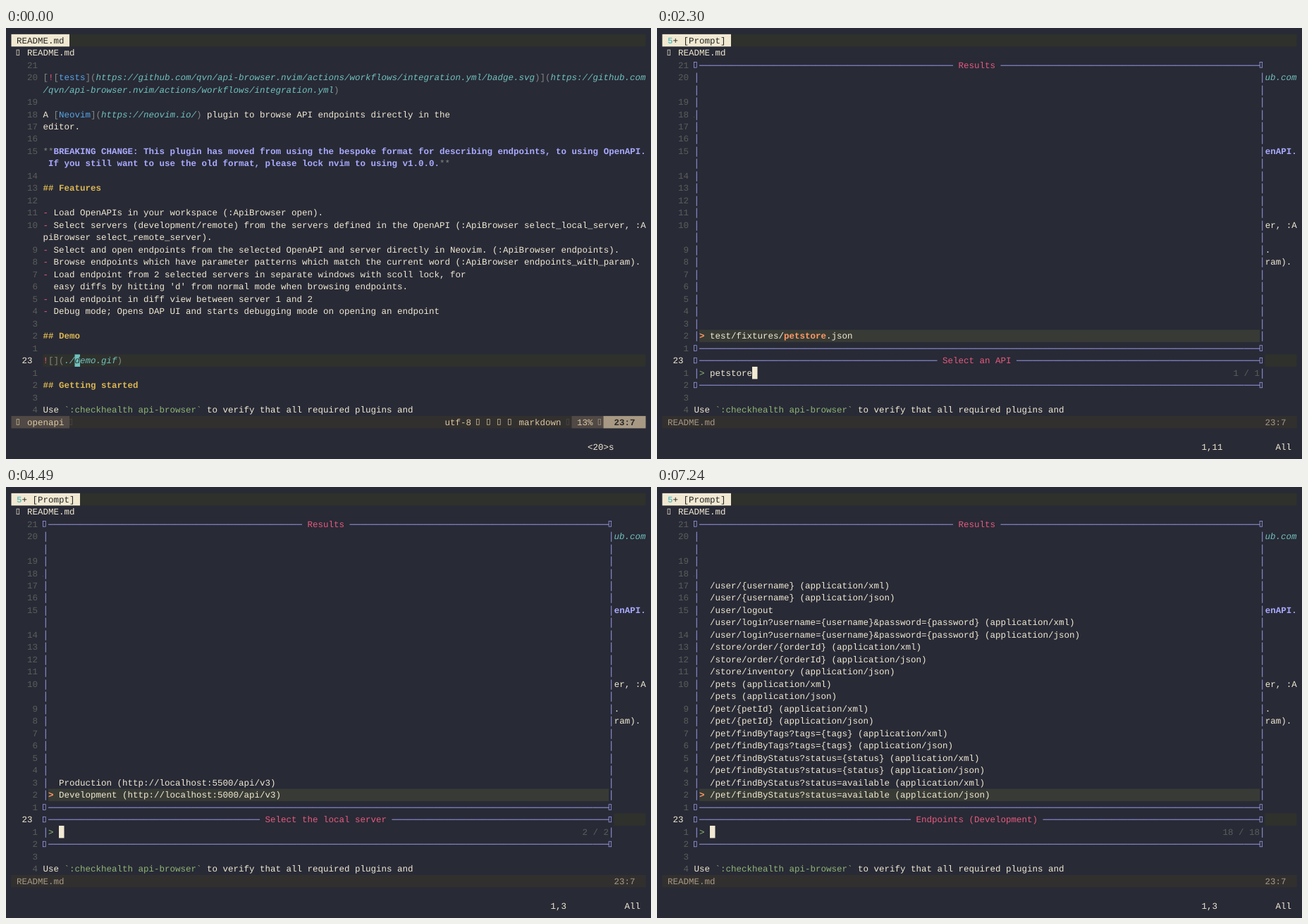
These frames come from a looping animation (915x612 px, 8 s). An HTML page:

```html
<!DOCTYPE html>
<html lang="en">
<head>
<meta charset="utf-8">
<title>API browser demo</title>
<style>
html, body { margin: 0; width: 100%; height: 100%; overflow: hidden; background: #282a36; }
svg {
  display: block;
  font-family: "Liberation Mono", monospace;
  font-size: 12.5px;
}
text { white-space: pre; text-rendering: geometricPrecision; }
.b { font-weight: 700; }
.i { font-style: italic; }
</style>
</head>
<body>
<svg id="stage" width="915" height="612" viewBox="0 0 915 612"></svg>
<script>
const LOOP = 8000, CELL = 7.5, LINE = 612 / 35, TOP = 8.85;
const BG = '#282a36', FG = '#f1e9d2', BAR = '#2f312c', PICK = '#383b35';
const GREY = '#5b5e5a', DIM = '#838781', RED = '#e75a7c', ORANGE = '#ff9966', YELLOW = '#dbb651';
const GREEN = '#8fb573', CYAN = '#70c2be', BLUE = '#57a5e5', PURPLE = '#aaaaff';
const SAND = '#ddc7a1', STONE = '#a89984', BROWN = '#504945', UMBER = '#32302f';

// Style codes for marked-up lines: colour, then bold or italic.
const STYLES = {
  n: [FG], g: [DIM], r: [RED], b: [BLUE], c: [GREEN],
  u: [CYAN, 'i'], p: [PURPLE, 'b'], y: [YELLOW, 'b']
};

const REPO = '/qvn/api-browser.nvim/actions/workflows/integration.yml';
// [line number, segments split by "|", each led by its style code]
const README = [
  [21, ''],
  [20, `g[|r!|g[|btests|g](|uhttps://github.com${REPO}/badge.svg|g)](|uhttps://github.com`],
  ['', `u${REPO}|g)`],
  [19, ''],
  [18, 'nA |g[|bNeovim|g](|uhttps://neovim.io/|g)|n plugin to browse API endpoints directly in the'],
  [17, 'neditor.'],
  [16, ''],
  [15, 'g**|pBREAKING CHANGE: This plugin has moved from using the bespoke format for describing endpoints, to using OpenAPI.'],
  ['', 'p If you still want to use the old format, please lock nvim to using v1.0.0.|g**'],
  [14, ''],
  [13, 'y## Features'],
  [12, ''],
  [11, 'r-|n Load OpenAPIs in your workspace (:ApiBrowser open).'],
  [10, 'r-|n Select servers (development/remote) from the servers defined in the OpenAPI (:ApiBrowser select_local_server, :A'],
  ['', 'npiBrowser select_remote_server).'],
  [9, 'r-|n Select and open endpoints from the selected OpenAPI and server directly in Neovim. (:ApiBrowser endpoints).'],
  [8, 'r-|n Browse endpoints which have parameter patterns which match the current word (:ApiBrowser endpoints_with_param).'],
  [7, 'r-|n Load endpoint from 2 selected servers in separate windows with scoll lock, for'],
  [6, "n  easy diffs by hitting 'd' from normal mode when browsing endpoints."],
  [5, 'r-|n Load endpoint in diff view between server 1 and 2'],
  [4, 'r-|n Debug mode; Opens DAP UI and starts debugging mode on opening an endpoint'],
  [3, ''],
  [2, 'y## Demo'],
  [1, ''],
  [23, 'r!|g[](|u./demo.gif|g)'],
  [1, ''],
  [2, 'y## Getting started'],
  [3, ''],
  [4, 'nUse |c`:checkhealth api-browser`|n to verify that all required plugins and']
];

const both = path => [`${path} (application/xml)`, `${path} (application/json)`];
const ENDPOINTS = [
  ...both('/user/{username}'),
  '/user/logout',
  ...both('/user/login?username={username}&password={password}'),
  ...both('/store/order/{orderId}'),
  '/store/inventory (application/json)',
  ...both('/pets'),
  ...both('/pet/{petId}'),
  ...both('/pet/findByTags?tags={tags}'),
  ...both('/pet/findByStatus?status={status}'),
  ...both('/pet/findByStatus?status=available')
];

const stage = document.getElementById('stage');
const colX = col => CELL * (col + 1);
const rowY = row => TOP + LINE * row;
const baseline = row => rowY(row) + 12.75;
const escapeXml = s => s.replace(/&/g, '&amp;').replace(/</g, '&lt;').replace(/>/g, '&gt;');

function fill(row, from, to, color, rows = 1) {
  return `<rect x="${colX(from)}" y="${rowY(row).toFixed(2)}" width="${CELL * (to - from)}" height="${(LINE * rows).toFixed(2)}" fill="${color}"/>`;
}

function put(row, col, str, color = FG, face = '') {
  if (!str) return '';
  return `<text x="${colX(col)}" y="${baseline(row).toFixed(2)}" fill="${color}" class="${face}">${escapeXml(str)}</text>`;
}

// Hollow box shown for glyphs the terminal font lacks.
function box(row, col, color) {
  const x = colX(col) + 0.1, y = baseline(row) - 8;
  return `<rect x="${x}" y="${y.toFixed(2)}" width="3.6" height="7.6" fill="none" stroke="${color}" stroke-width=".7"/>`;
}

function marked(row, line) {
  let col = 6, out = '';
  if (line) for (const part of line.split('|')) {
    const str = part.slice(1);
    out += put(row, col, str, ...STYLES[part[0]]);
    col += str.length;
  }
  return out;
}

function page() {
  let out = box(1, 1, FG) + put(1, 3, 'README.md') + fill(26, 6, 120, BAR);
  README.forEach(([num, line], i) => {
    const row = i + 2, label = String(num);
    out += num === 23 ? put(row, 2, label) : put(row, 5 - label.length, label, GREY);
    out += marked(row, line);
  });
  return out + fill(26, 12, 13, CYAN) + put(26, 12, 'd', BAR, 'i');
}

function tab(prompt) {
  const back = fill(0, 0, 120, BAR) + fill(0, 0, prompt ? 13 : 11, FG);
  return back + (prompt
    ? put(0, 1, '5', CYAN, 'b') + put(0, 2, '+ [Prompt]', '#252623')
    : put(0, 1, 'README.md', '#252623'));
}

function status(active) {
  const back = fill(31, 0, 120, UMBER);
  if (!active) return back + put(31, 1, 'README.md', STONE) + put(31, 114, '23:7', STONE);
  return back + fill(31, 0, 11, BROWN) + fill(31, 106, 112, BROWN) + fill(31, 112, 120, STONE)
    + box(31, 1, SAND) + put(31, 3, 'openapi', SAND) + box(31, 11, BROWN)
    + put(31, 82, 'utf-8', SAND) + [88, 90, 92, 94].map(c => box(31, c, SAND)).join('')
    + put(31, 96, 'markdown', SAND) + box(31, 105, BROWN)
    + put(31, 107, '13%', SAND) + box(31, 111, STONE)
    + put(31, 114, '23:7', '#282828', 'b');
}

function border(row, title) {
  const ends = box(row, 6, PURPLE) + box(row, 113, PURPLE);
  if (!title) return ends + put(row, 7, '─'.repeat(106), PURPLE);
  const room = 104 - title.length, left = Math.floor(room / 2);
  return ends + put(row, 7, '─'.repeat(left), PURPLE)
    + put(row, 8 + left, title, RED)
    + put(row, 9 + left + title.length, '─'.repeat(room - left), PURPLE);
}

// items: [text, match start, match length], the last one is selected.
function picker({ title, items, total, query }) {
  let out = fill(2, 6, 114, BG, 27) + border(2, 'Results') + border(25) + border(26, title) + border(28);
  for (let row = 3; row <= 27; row++) {
    if (row < 25 || row === 27) out += put(row, 6, '│', PURPLE) + put(row, 113, '│', PURPLE);
  }
  items.forEach(([str, at = 0, len = 0], i) => {
    const row = 25 - items.length + i;
    if (row === 24) out += fill(row, 7, 113, PICK) + put(row, 7, '>', ORANGE, 'b');
    out += put(row, 9, str.slice(0, at))
      + put(row, 9 + at, str.slice(at, at + len), ORANGE, 'b')
      + put(row, 9 + at + len, str.slice(at + len));
  });
  if (total) {
    const count = `${items.length} / ${total}`;
    out += put(27, 113 - count.length, count, GREY);
  }
  const end = 9 + query.length;
  return out + put(27, 7, '>', GREEN) + put(27, 9, query) + fill(27, end, end + 1, FG);
}

const typed = (word, times, t) => word.slice(0, times.filter(at => t >= at).length);
const keys = (t, first, second) => t >= second ? '<20>s' : t >= first ? '<20>' : '';

function apiPicker(t) {
  const query = typed('petstore', [1560, 1750, 1790, 1950, 2040, 2130, 2210, 2300], t);
  const ready = t >= 810;
  return {
    title: 'Select an API', query, total: ready ? 1 : 0,
    items: ready ? [['test/fixtures/petstore.json', 14, query.length]] : []
  };
}

function serverPicker(t) {
  const query = typed('develop', [5060, 5170, 5360, 5440, 5520, 5700, 5870], t), n = query.length;
  const items = [['Development (http://localhost:5000/api/v3)', 0, n]];
  if (n < 2) items.unshift(['Production (http://localhost:5500/api/v3)', 3, n]);
  return { title: 'Select the local server', query, total: 2, items };
}

const endpointPicker = () => ({
  title: 'Endpoints (Development)', query: '', total: 18, items: ENDPOINTS.map(e => [e])
});

function stateAt(t) {
  if (t < 260) return { ruler: '', cmd: '<20>s' };
  if (t < 2880) return { pick: apiPicker(t), active: t < 810 };
  if (t < 4490) return { ruler: '1,11', cmd: keys(t, 4220, 4310) };
  if (t < 6140) return { pick: serverPicker(t) };
  if (t < 7240) return { ruler: '1,10', cmd: keys(t, 6980, 7050) };
  return { pick: endpointPicker() };
}

const base = `<rect width="915" height="612" fill="${BG}"/>` + page();
let shown = '';

function render(t) {
  const { pick, active = !pick, ruler = pick ? `1,${3 + pick.query.length}` : '', cmd = '' } = stateAt(t);
  const view = base + tab(pick) + status(active) + (pick ? picker(pick) : '')
    + put(33, 102, ruler) + (cmd ? put(33, 109, cmd) : put(33, 116, 'All'));
  if (view !== shown) stage.innerHTML = shown = view;
}

const start = performance.now();
function tick() {
  render((performance.now() - start) % LOOP);
  requestAnimationFrame(tick);
}
tick();
</script>
</body>
</html>
```
